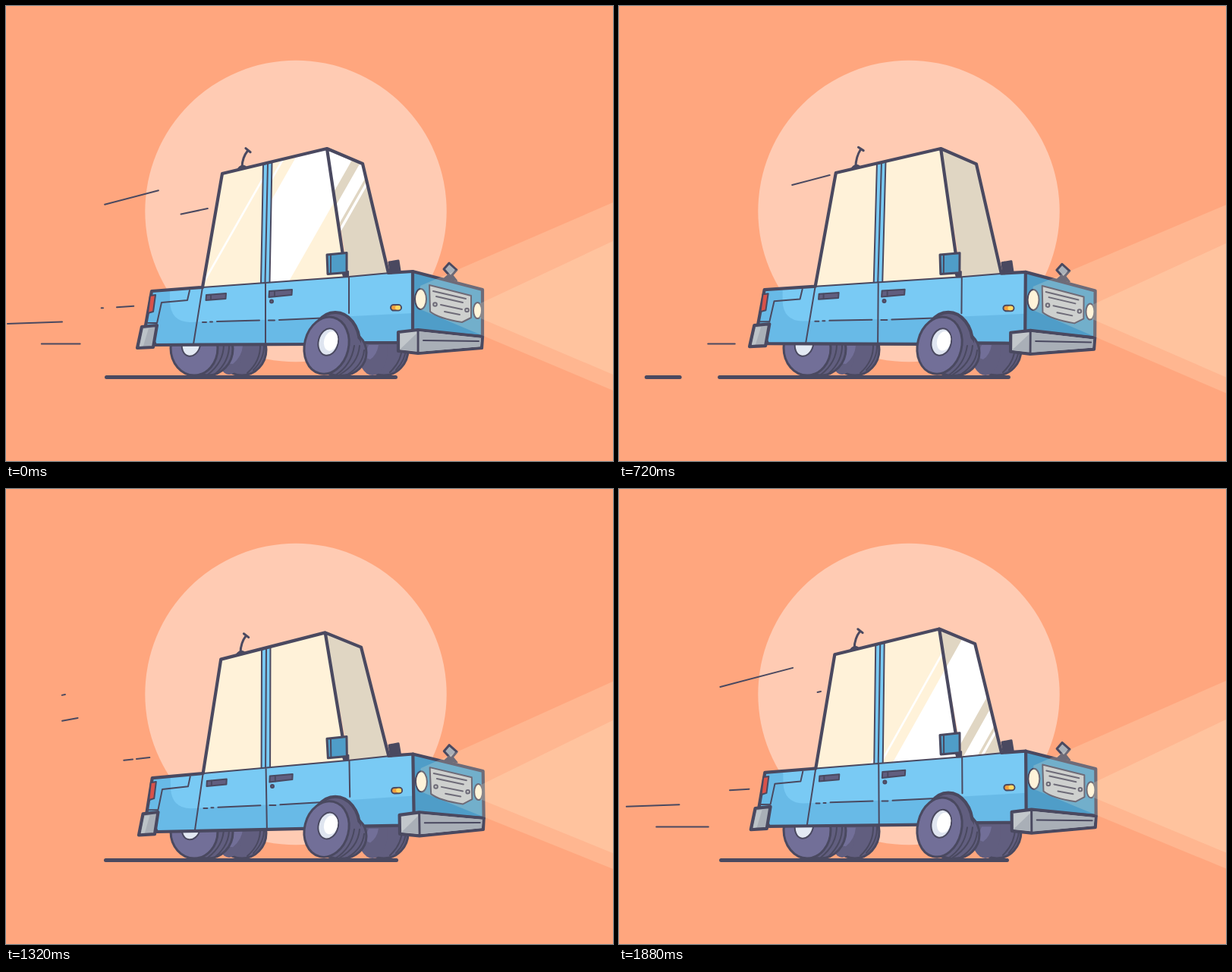
These frames come from a looping animation (800 px wide and 600 px high, 1.92 s). An HTML page:

```html
<!DOCTYPE html>
<html lang="en">
<head>
<meta charset="utf-8">
<title>Car ride</title>
<style>
  html, body { margin: 0; width: 100%; height: 100%; overflow: hidden; background: #ffa67e; }
  svg { display: block; width: 800px; height: 600px; }
  .ink { stroke: #4a4960; stroke-linecap: round; stroke-linejoin: round; }
  .bold { stroke-width: 4.2; }
  .mid { stroke-width: 3; }
  .thin { stroke-width: 2; }
  .none { fill: none; }
  .light { fill: #79caf4; }
  .side { fill: #68bae7; }
  .deep { fill: #4f9dc8; }
  .cream { fill: #fff2d9; }
  .shade { fill: #e0d6c3; }
  .dark { fill: #615e7f; }
  .tyre { fill: #726f98; }
  .steel { fill: #a9afb7; }
  .chrome { fill: #c2c7cb; }
  .beam { fill: #fff3d8; opacity: .2; }
</style>
</head>
<body>
<svg viewBox="0 0 800 600">
  <defs>
    <clipPath id="rear"><path d="M259 371L285 221 345 207 342 366Z"/></clipPath>
    <clipPath id="front"><path d="M345 207L423 188 448 356 342 366Z"/></clipPath>
    <clipPath id="screen"><path d="M423 188L470 208 504 352 452 356Z"/></clipPath>
  </defs>

  <rect width="800" height="600" fill="#ffa67e"/>
  <circle cx="382" cy="270.5" r="198.7" fill="#ffcbb3"/>
  <g id="wind" class="ink none"></g>

  <g id="rearWheels" class="ink mid">
    <ellipse class="dark" cx="311" cy="453" rx="32" ry="34"/>
    <path class="none thin" d="M318 484Q336 468 335 446M326 480Q341 465 340 446"/>
    <ellipse class="dark" cx="294" cy="453" rx="17" ry="33" stroke="none"/>
    <path class="tyre" d="M297 448h15q-1 14-13 24-8 0-12-6z" stroke="none"/>
    <ellipse class="dark" cx="266" cy="452" rx="33" ry="35"/>
    <path class="none thin" d="M266 486Q287 470 287 446M276 485Q295 468 294 446"/>
    <ellipse class="tyre" cx="248" cy="451" rx="31" ry="36"/>
    <ellipse class="thin" cx="244" cy="446" rx="12" ry="16" fill="#e3e9f3" transform="rotate(14 244 446)"/>
    <ellipse class="dark" cx="498" cy="453" rx="32" ry="34"/>
    <ellipse class="dark" cx="483" cy="453" rx="20" ry="34" stroke="none"/>
    <path class="tyre" d="M478 447h13q-2 13-11 19-7-2-8-6z" stroke="none"/>
    <path class="none thin" d="M506 483Q522 468 522 448M514 480Q528 465 527 448"/>
  </g>

  <path id="ground" class="ink none" stroke-width="5"/>

  <g id="body" class="ink">
    <path id="antenna" class="none mid"/>
    <path d="M305 216q6-9 12-3z" fill="#4a4960" class="thin"/>

    <path d="M505 338L517 336 519 349 507 352Z" fill="#4a4960" class="mid"/>
    <path class="cream" stroke="none" d="M259 371L285 221 423 188 448 356Z"/>
    <path class="shade" stroke="none" d="M423 188L470 208 504 352 452 356Z"/>
    <g id="panes" fill="#fff" stroke="none"></g>
    <path class="light thin" d="M339 209L350.500 206 347.500 365 336 366Z"/>
    <path class="none thin" d="M345 208L341.500 365"/>
    <path class="none bold" d="M259 371L285 221 423 188 470 208 504 352M423 188L448 355"/>

    <path class="side" stroke="none" d="M192 376L452 357 536 350V444H467L403 447 197 447 184 421Z"/>
    <path class="light" stroke="none" d="M216 374L452 357 536 350V405L400 412 242 417Q217 416 216 390Z"/>
    <path class="deep bold" d="M536 350L628 374V436L536 428Z"/>
    <path class="none bold" d="M259 371L192 376 184 421 197 447 403 446M465 444H520M504 352L536 350"/>
    <path class="none thin" d="M259 371L452 357 506 352M259 371L247 446M342 366V446M452 357V405"/>
    <path class="none thin" d="M242 375L239 388 205 391 199 418 187 418"/>
    <path class="none thin" d="M259 417H264M269 416.500H272M278 416L334 414.500M346 414.500H354M360 414L416 411.500"/>
    <path class="thin" fill="#d9524a" d="M190 382L197 381 194 403 187 405Z"/>
    <path class="steel bold" d="M179 423L199 421 194 450 173 451Z"/>
    <path d="M181 426L188 425 181 448 176 449Z" fill="#bcc3c8" stroke="none"/>

    <path class="dark thin" d="M264 381L290 379 289.500 386 263.500 388Z"/>
    <path class="dark thin" d="M347 376L377 374 376.500 381 346.500 384Z"/>
    <path class="none thin" d="M270 381V387M354 376V383"/>
    <circle class="dark thin" cx="350" cy="389.500" r="2"/>
    <path d="M443 350H451V357H445Z" fill="#4a4960" class="thin"/>
    <path class="deep mid" d="M423 328L449 325.500V351.500L424 353.500Z"/>
    <path class="none thin" d="M428 329V352"/>
    <rect class="thin" x="507" y="394" width="14" height="7.500" rx="3.700" fill="#f5a03c"/>
    <rect x="513" y="395" width="7" height="5.500" rx="2.500" fill="#ffd965" stroke="none"/>

    <path class="chrome thin" d="M558 368L613 382V411L601 417Q570 412 559 403Z"/>
    <path class="none thin" d="M563 376L606 386M567 383L602 391M573 394L601 400M578 403L598 407"/>
    <circle class="chrome thin" cx="565.500" cy="393.500" r="2.300"/>
    <circle class="chrome thin" cx="607.500" cy="401" r="2.300"/>
    <ellipse class="cream thin" cx="546.500" cy="386.500" rx="7.500" ry="13.500"/>
    <ellipse class="cream thin" cx="621.500" cy="401.500" rx="5.500" ry="10.500"/>
    <path d="M578 359L586 352 594 362Z" fill="#4a4960" class="thin"/>
    <path class="steel mid" d="M584 339L594 348 586 357 577 347Z"/>
  </g>

  <g id="frontWheel" class="ink mid">
    <ellipse class="dark" cx="444" cy="457" rx="31" ry="30"/>
    <ellipse class="dark bold" cx="434" cy="445" rx="32" ry="41"/>
    <ellipse class="dark" cx="440" cy="457" rx="31" ry="29" stroke="none"/>
    <path class="none thin" d="M440 486Q464 472 466 448M450 486Q470 474 472 454M434 487Q455 474 459 448"/>
    <g transform="rotate(14 424 446)">
      <ellipse class="tyre" cx="423" cy="448" rx="29" ry="38"/>
      <ellipse class="thin" cx="424" cy="443" rx="13" ry="18" fill="#dfe5f0"/>
      <ellipse cx="427" cy="441" rx="9" ry="13" fill="#fff" stroke="none"/>
    </g>
  </g>

  <g id="nose">
    <g class="ink">
      <path class="chrome bold" d="M517 430L543 427 628 436 627 451 543 458 517 455Z"/>
      <path class="steel" stroke="none" d="M543 429L626 438 625 449 543 456Z"/>
      <path class="steel" stroke="none" d="M519 453L541 432V455Z"/>
      <path class="none mid" d="M543 428V457"/>
      <path class="none thin" d="M550 441L623 442"/>
    </g>
    <path class="beam" d="M546 369L820 250.400V515.400L546 400Z"/>
    <path class="beam" d="M621 394L820 300.600V494.500L621 410Z"/>
  </g>
</svg>
<script>
  const LOOP = 1920, STEP = 40, HALF = LOOP / 2;
  const $ = id => document.getElementById(id);
  const cubic = u => u < .5 ? 4 * u ** 3 : 1 - 4 * (1 - u) ** 3;

  function add(parent, tag, attrs) {
    const el = document.createElementNS('http://www.w3.org/2000/svg', tag);
    for (const k in attrs) el.setAttribute(k, attrs[k]);
    return parent.appendChild(el);
  }

  // A line that runs left from one x to another: the head eases out, the tail eases in.
  const streak = (from, to, y, start, time = 355, more = {}) => ({
    from, to, y, start, time, power: 3, ...more,
    slope: Math.max(0, 446 - y) / 850,
    el: add($('wind'), 'path', { 'stroke-width': more.width || 2 })
  });
  const streaks = [
    streak(278, 129, 223, 675),
    streak(266, 160, 267, 915),
    streak(150, 74, 292, 1095, 250),
    streak(78, 68, 271, 1270, 300),
    streak(190, 123, 354, 1293, 125, { gap: [167, 172] }),
    streak(174, 117, 395.5, 795, 355, { gap: [128, 146] }),
    streak(168, 138, 415, 640, 75),
    streak(86, -10, 416, 740, 440),
    streak(153, 46, 445.5, 675),
    streak(130, -20, 489.5, 648, 150, { width: 5, power: 1.5 })
  ];

  function drawStreak(s, t) {
    const u = (t - s.start) / s.time;
    let d = '';
    const part = (a, b) => {
      if (b - a > .5) d += `M${a} ${s.y + (s.from - a) * s.slope}L${b} ${s.y + (s.from - b) * s.slope}`;
    };
    if (u > 0 && u < 1) {
      const run = s.to - s.from, [g0, g1] = s.gap || [s.from, s.from];
      const head = s.from + run * (1 - (1 - u) ** s.power);
      const tail = s.from + run * u ** s.power;
      part(head, Math.min(tail, g0));
      part(Math.max(head, g1), tail);
    }
    s.el.setAttribute('d', d);
  }

  // Slanted reflections per pane: offset and width at y = 270
  const panes = { rear: [[0, 3], [75, 84]], front: [[12, 3], [29, 84]], screen: [[29, 76], [118, 18], [140, 4]] };
  const shines = Object.entries(panes).map(([id, bands]) => {
    const pane = add($('panes'), 'g', { 'clip-path': `url(#${id})` });
    const d = bands.map(([x, w]) => `M${x + 51} 180h${w}l-114 200h${-w}Z`).join('');
    return add(pane, 'path', { d });
  });

  function drawAntenna(t) {
    const u = t % 640 / 320;
    const lean = u < 1 ? 8 - 20 * cubic(u) : -12 + 20 * cubic(u - 1);
    const x = 311 + lean, y = 187 + .05 * lean * lean;
    const dx = lean, dy = y - 200, n = 4 / Math.hypot(dx, dy);
    const bx = -dy * n, by = dx * n;
    $('antenna').setAttribute('d',
      `M311 213Q311 200 ${x} ${y}M${x - bx} ${y - by}L${x + bx} ${y + by}`);
  }

  function drawCar(t) {
    const wave = n => Math.sin(2 * Math.PI * n * t / LOOP);
    const drop = 4.5 * wave(5) + 1.5 * wave(6) - 1.5 * wave(2);
    const tilt = .86 * wave(1) + .23 * (wave(4) + wave(5));
    const half = 193 + .6 * drop;
    const squash = `translate(0 488) scale(1 ${1 - drop / 85}) translate(0 -488)`;
    for (const id of ['body', 'nose'])
      $(id).setAttribute('transform', `translate(0 ${drop}) rotate(${tilt} 400 330)`);
    for (const id of ['rearWheels', 'frontWheel']) $(id).setAttribute('transform', squash);
    $('ground').setAttribute('d', `M${325.5 - half} 489.500H${320.5 + half}`);
  }

  function draw(t) {
    drawCar(t);
    drawAntenna(t);

    const phase = t % HALF;
    for (const s of streaks) drawStreak(s, phase < 600 ? phase + HALF : phase);

    const since = (phase + HALF - 720) % HALF;
    const lead = 540 - 415 * (since / 320) ** 2.1;
    for (const el of shines) el.setAttribute('transform', `translate(${lead} 0)`);
  }

  function tick() {
    draw(Math.floor(performance.now() % LOOP / STEP) * STEP);
    requestAnimationFrame(tick);
  }
  tick();
</script>
</body>
</html>
```
